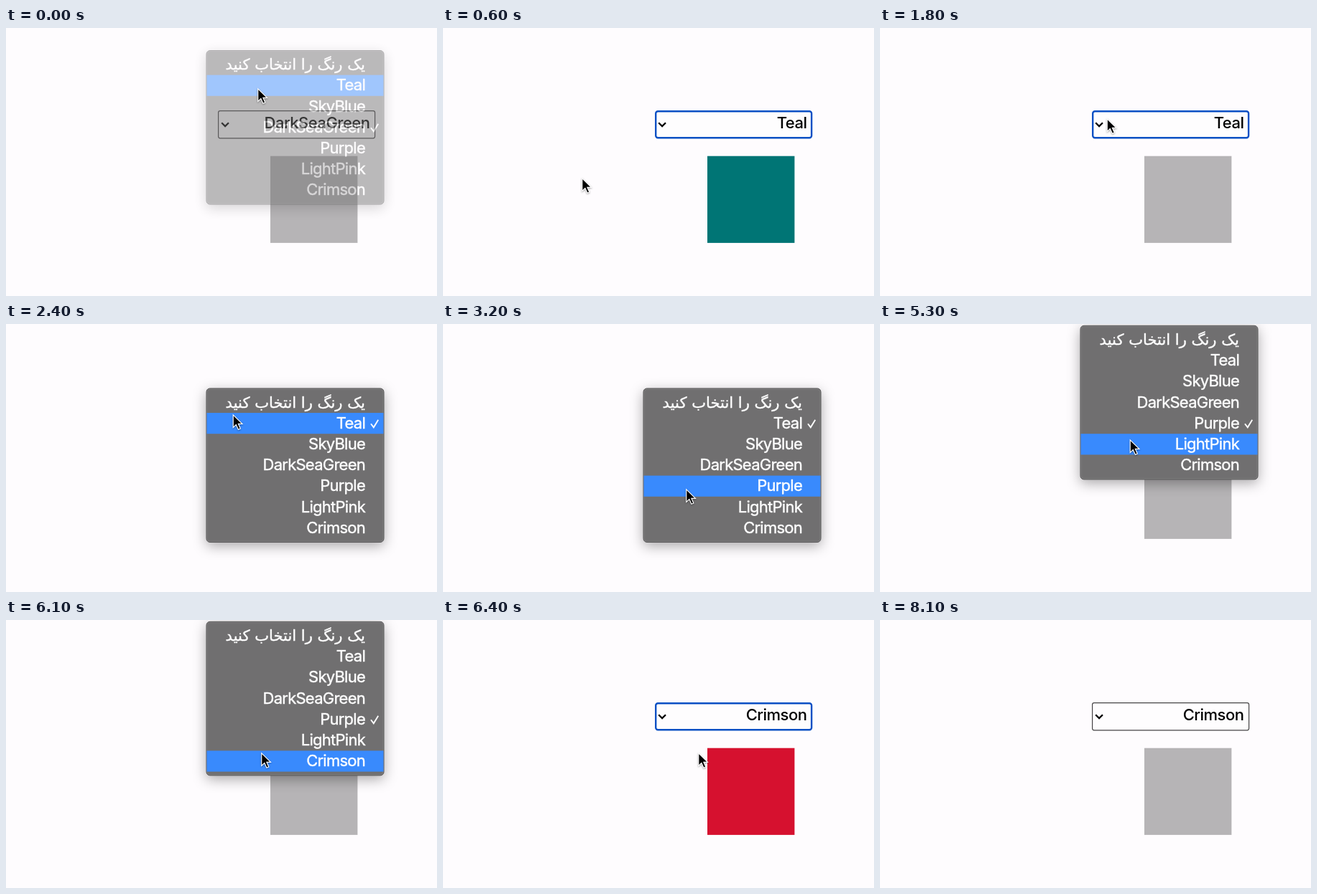
An HTML page for the animation above (8500 ms loop, 600x374 px).

```html
<!DOCTYPE html>
<html lang="fa">
<head>
<meta charset="utf-8">
<title>Color select</title>
<style>
  html, body { margin: 0; width: 100%; height: 100%; overflow: hidden; background: #fefcfe; }
  svg { display: block; width: 600px; height: 374px; }
  text { font-family: Inter, "Noto Sans", "DejaVu Sans", sans-serif; font-size: 22px; }
  #value { font-weight: 500; letter-spacing: -.5px; text-anchor: end; }
  #items { fill: #fff; stroke: #fff; stroke-width: .4; }
  .item { letter-spacing: -.75px; text-anchor: end; }
  .prompt { font-family: "DejaVu Sans", sans-serif; font-size: 21.1px; direction: rtl; text-anchor: start; }
  #panel { filter: drop-shadow(0 5px 9px rgba(0, 0, 0, .33)); }
  #cursor { filter: drop-shadow(0 1px 1px rgba(0, 0, 0, .35)); }
</style>
</head>
<body>
<svg viewBox="0 0 600 374">
  <rect id="square" x="368" y="178.7" width="121.4" height="121.2"/>
  <rect id="box" fill="#fefdfe"/>
  <path d="M300.2 132.2l4.9 4.9 4.9-4.9" fill="none" stroke="#000" stroke-width="2.3"/>
  <text id="value" x="506.5" y="140"></text>
  <g id="menu">
    <rect id="panel" x="279" y=".5" width="247" height="214.6" rx="5" fill="#706f70" stroke="#515051"/>
    <rect x="280" y="1.5" width="245" height="212.6" rx="4" fill="none" stroke="#848384" stroke-width=".8"/>
    <rect id="mark" x="279.5" width="246" height="29.2" fill="#398afd"/>
    <g id="items"></g>
    <path id="check" d="M508 0l3.8 5 6.4-10.5" fill="none" stroke="#fff" stroke-width="1.9"/>
  </g>
  <path id="cursor" d="M.7 .8V17.5L4.6 13.8L7.5 20.3L10.3 19.1L7.5 12.7H12.8Z" fill="#000" stroke="#fff" stroke-width="1.1"/>
</svg>
<script>
  const LOOP = 8500, STEP = 100, FADE = 200, ROW = 29.2, PAD = 5.4;
  const GRAY = '#b6b4b6', BLUR = 7800, HIDE = 7400;
  const labels = ['یک رنگ را انتخاب کنید', 'Teal', 'SkyBlue', 'DarkSeaGreen', 'Purple', 'LightPink', 'Crimson'];
  const $ = id => document.getElementById(id);
  const set = (el, attrs) => { for (const k in attrs) el.setAttribute(k, attrs[k]); };

  // The square keeps its color until the cursor touches the box again.
  const picks = [
    { open: 0, shut: 0, value: 1, color: '#007575', touch: 1600 },
    { open: 2100, shut: 3400, value: 4, color: '#730073', touch: 4700 },
    { open: 4900, shut: 6200, value: 6, color: '#d6112f', touch: 7200 }
  ];
  const before = { value: 3, color: GRAY, touch: 0 };

  const moves = [
    { from: 300, to: 600, x: 193, y: 209 },
    { from: 900, to: 1800, x: 315.5, y: 126 },
    { from: 2400, to: 3200, x: 338, y: 230 },
    { from: 3400, to: 3600, x: 331, y: 201 },
    { from: 4400, to: 4900, x: 340, y: 138 },
    { from: 4900, to: 5300, x: 347.5, y: 161 },
    { from: 5300, to: 5800, x: 355, y: 185 },
    { from: 6900, to: 7300, x: 376, y: 134 }
  ];

  const clamp = (v, lo, hi) => Math.max(lo, Math.min(hi, v));

  function cursorAt(t) {
    let x = 350, y = 84;
    for (const m of moves) {
      const k = clamp((t - m.from) / (m.to - m.from), 0, 1);
      const ease = k * k * (3 - 2 * k);
      x += (m.x - x) * ease;
      y += (m.y - y) * ease;
    }
    return [x, y];
  }

  const rowMiddle = i => PAD + ROW * (i + .5);

  labels.forEach((label, i) => {
    const text = document.createElementNS('http://www.w3.org/2000/svg', 'text');
    text.textContent = label;
    set(text, { class: i ? 'item' : 'prompt', x: 500, y: rowMiddle(i) + 7.2 });
    $('items').append(text);
  });

  function draw(t) {
    const [x, y] = cursorAt(t);
    const chosen = picks.filter(p => p.shut + FADE <= t).pop() || before;
    const shown = picks.find(p => t >= p.open && t < p.shut + FADE);
    const focused = t >= FADE && t < BLUR;

    set($('square'), { fill: t < chosen.touch ? chosen.color : GRAY });
    set($('box'), focused
      ? { x: 296.2, y: 116.2, width: 216.9, height: 37, rx: 3, stroke: '#0a50c4', 'stroke-width': 2.4 }
      : { x: 295.6, y: 115.6, width: 218, height: 38.2, rx: 2.5, stroke: '#454445', 'stroke-width': 1.2 });
    $('value').textContent = labels[chosen.value];

    set($('menu'), { visibility: shown ? 'visible' : 'hidden' });
    if (shown) {
      const top = 118.6 - ROW * chosen.value;
      const fading = t >= shown.shut;
      const hover = clamp(Math.floor((y - top - PAD) / ROW), 1, labels.length - 1);
      set($('menu'), {
        transform: `translate(0 ${top})`,
        opacity: fading ? .47 * (1 - (t - shown.shut) / FADE) : 1
      });
      set($('mark'), { y: PAD + ROW * (fading ? shown.value : hover) });
      set($('check'), { transform: `translate(0 ${rowMiddle(chosen.value) + .6})` });
    }
    set($('cursor'), {
      transform: `translate(${x} ${y}) scale(1.05)`,
      visibility: t < HIDE ? 'visible' : 'hidden'
    });
  }

  const start = performance.now();
  function tick() {
    const t = (performance.now() - start) % LOOP;
    draw(Math.floor(t / STEP) * STEP);
    requestAnimationFrame(tick);
  }
  tick();
</script>
</body>
</html>
```
